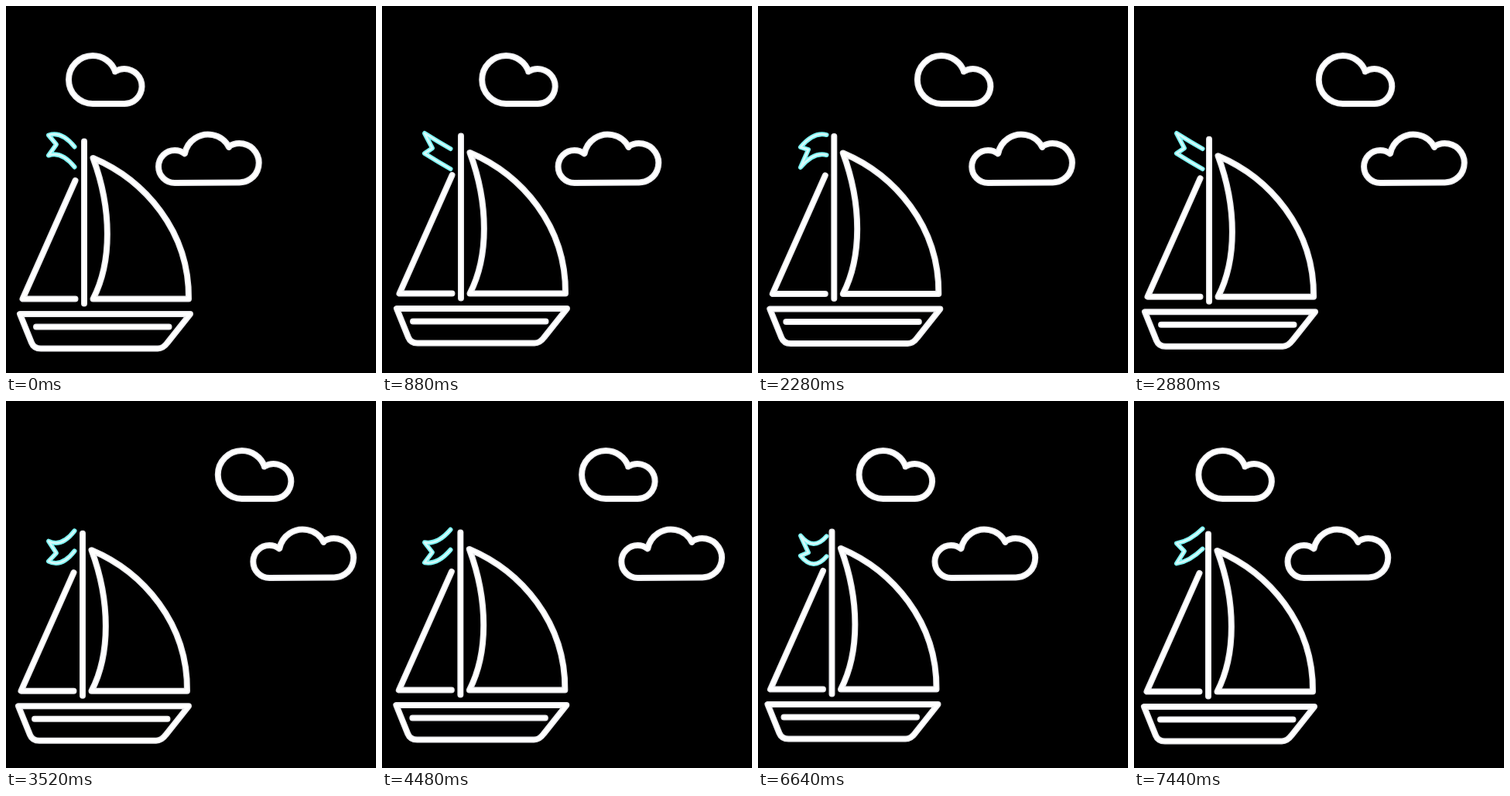
Write an HTML page with a canvas that moves like this. It is 478 px wide and 473 px high and loops after 7.48 s.

```html
<!DOCTYPE html>
<html lang="en">
<head>
<meta charset="utf-8">
<title>Sailing boat</title>
<style>
  html, body { margin: 0; width: 100%; height: 100%; overflow: hidden; background: #000; }
  canvas { display: block; width: 478px; height: 473px; }
</style>
</head>
<body>
<canvas id="stage" width="478" height="473"></canvas>
<script>
const ctx = document.getElementById('stage').getContext('2d');
const W = 478, H = 473;
const LOOP = 7480, STEP = 40, TURN = 3880, FLAP = 1000;

// Turning points of the boat's drift: [time, offset]
const swayX = [[0, 0], [900, 1], [3000, -4], [4200, 1], [5400, -4], [6640, -5.5], [LOOP, -5]];
const swayY = [[0, 0], [900, -7], [1550, -4], [2150, -6.7], [3150, -2],
  [4000, -6.5], [5600, 0.8], [6600, -6], [LOOP, -3]];

const boat = [
  'M101 174.5V383.5',
  'M89.5 225L21.5 377.5H89.5',
  'M112.5 196C179 224 237 290 236 377.5H112.5C137 330 137 262 112.5 196Z',
  'M18 397H238L208.5 434Q203 441.5 196 441.5H45Q36 441.5 33 434Z',
  'M39 413.5H210.5'
].map(d => new Path2D(d));

// Eased swing from one turning point to the next
function sway(points, t) {
  const i = points.findIndex(p => p[0] > t);
  const [t0, v0] = points[i - 1], [t1, v1] = points[i];
  const ease = (1 - Math.cos(Math.PI * (t - t0) / (t1 - t0))) / 2;
  return v0 + (v1 - v0) * ease;
}

function stroke(path, edge, core, wide, thin) {
  ctx.strokeStyle = edge;
  ctx.lineWidth = wide;
  ctx.stroke(path);
  ctx.strokeStyle = core;
  ctx.lineWidth = thin;
  ctx.stroke(path);
}

const white = path => stroke(path, '#e9e9ec', '#ffffff', 8, 5);

// Outline of round lobes [x, y, r] that meet at the given notches
function makeCloud(lobes, notches) {
  const path = new Path2D();
  lobes.forEach(([x, y, r], i) => {
    const angle = p => p ? Math.atan2(p[1] - y, p[0] - x) : Math.PI / 2;
    path.arc(x, y, r, angle(notches[i - 1]), angle(notches[i]));
  });
  path.closePath();
  return path;
}

const smallCloud = makeCloud([[112, 95, 31], [153, 103.5, 22.5]], [[141, 84.5]]);
const bigCloud = makeCloud(
  [[218, 207, 21], [261, 196, 30.5], [301.5, 202.2, 25.2]],
  [[231, 190], [288, 182]]
);

function at(x, y, draw) {
  ctx.save();
  ctx.translate(x, y);
  draw();
  ctx.restore();
}

// The ends swing against each other while the middle bends a quarter turn later
function drawFlag(t) {
  const right = 88.5, left = 55, mid = (left + right) / 2, gap = 26;
  const phase = -0.73 - t / FLAP * Math.PI * 2;
  const swing = 10 * Math.cos(phase), bend = 174 + 20 * Math.sin(phase);
  const head = 174 + swing, tail = 174 - swing;
  const notch = 0.09 * head + 0.42 * bend + 0.49 * tail + gap / 2;
  const path = new Path2D();
  path.moveTo(right, head);
  path.quadraticCurveTo(mid, bend, left, tail);
  path.lineTo(65, notch);
  path.lineTo(left, tail + gap);
  path.quadraticCurveTo(mid, bend + gap, right, head + gap);
  stroke(path, '#7df3f3', '#d8fcfc', 6, 2.5);
}

function render(now) {
  const t = Math.floor((now % LOOP) / STEP) * STEP;
  const sail = t < TURN ? t / TURN : (LOOP - t) / (LOOP - TURN);
  ctx.fillStyle = '#000';
  ctx.fillRect(0, 0, W, H);
  ctx.lineCap = ctx.lineJoin = 'round';
  at(212.5 * sail, 0, () => white(smallCloud));
  at(134.8 * sail, 0, () => white(bigCloud));
  drawFlag(t);
  at(sway(swayX, t), sway(swayY, t), () => boat.forEach(white));
}

const start = performance.now();
function tick() {
  render(performance.now() - start);
  requestAnimationFrame(tick);
}
tick();
</script>
</body>
</html>
```
